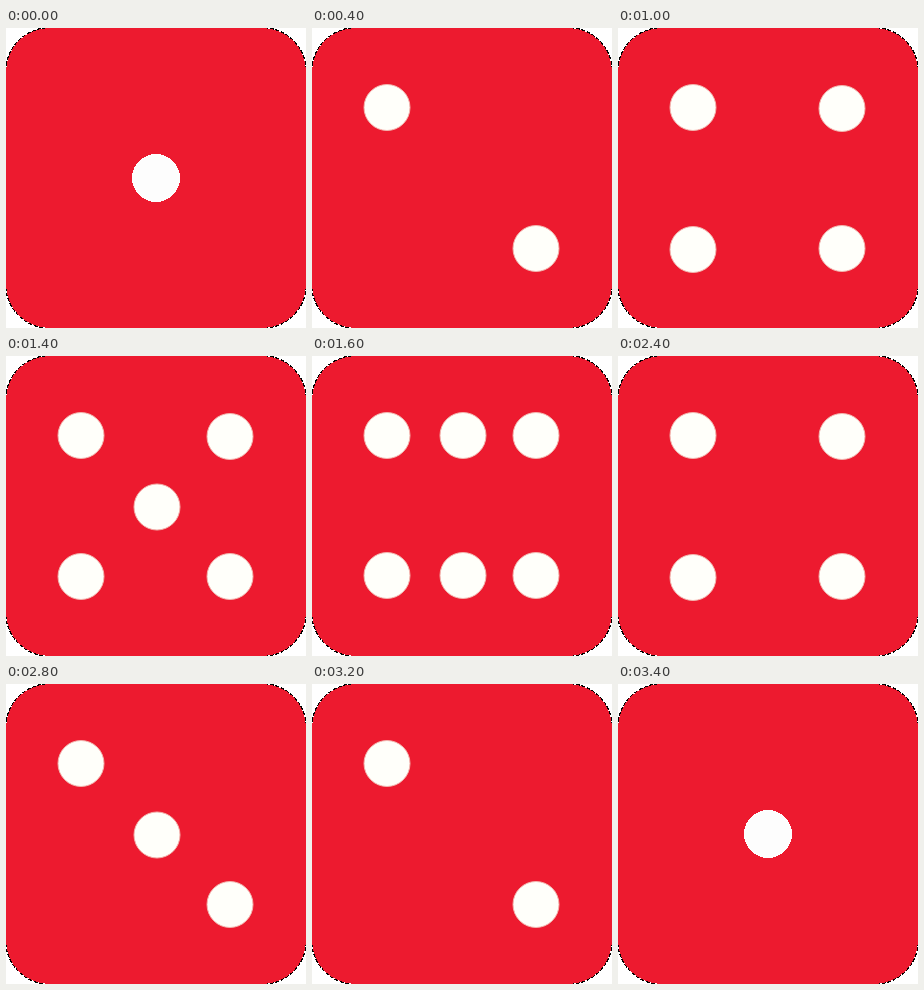
An HTML page for the animation above (3600 ms loop, 300x300 px).

```html
<!DOCTYPE html>
<html lang="en">
<head>
<meta charset="utf-8">
<title>Die</title>
<style>
  html, body { margin: 0; width: 100%; height: 100%; overflow: hidden; background: #fff; }
  svg { display: block; width: 100%; height: 100%; }
</style>
</head>
<body>
<svg viewBox="0 0 300 300">
  <g shape-rendering="crispEdges">
    <!-- broken dark rim, visible only around the corners -->
    <rect width="300" height="300" rx="44" fill="none" stroke="#000" stroke-width="2" stroke-dasharray="4 1.5"/>
    <rect width="300" height="300" rx="44" fill="#ed1a2f"/>
  </g>
  <g id="pips"></g>
</svg>
<script>
  const LOOP = 3600;
  const TL = [75, 79.5], TR = [224, 80.5], BL = [75, 220.5], BR = [224, 220.5];
  const MID = [151, 151];

  const faces = {
    1: [[150, 150]],
    2: [TL, BR],
    3: [TL, MID, BR],
    4: [TL, TR, [75, 221.5], BR],
    5: [TL, TR, MID, BL, BR],
    6: [79.5, 219.5].flatMap(y => [75, 151, 224].map(x => [x, y]))
  };

  // [start in ms, face value]
  const steps = [
    [0, 1], [400, 2], [600, 3], [1000, 4], [1400, 5], [1600, 6],
    [2200, 5], [2400, 4], [2800, 3], [3200, 2], [3400, 1]
  ];

  // the single pip is hard-edged, the others have a soft rim
  const single = { r: 24, fill: '#fdfdfd', stroke: 'none', 'shape-rendering': 'crispEdges' };
  const soft = { r: 23, fill: '#fffffa', stroke: '#f2b5ae', 'shape-rendering': 'auto' };

  const group = document.getElementById('pips');
  const pips = Array.from({ length: 6 }, () =>
    group.appendChild(document.createElementNS('http://www.w3.org/2000/svg', 'circle')));

  function set(node, attrs) {
    for (const name in attrs) node.setAttribute(name, attrs[name]);
  }

  function draw(time) {
    const t = time % LOOP;
    const value = steps.filter(([start]) => start <= t).pop()[1];
    const style = value === 1 ? single : soft;
    pips.forEach((pip, i) => {
      const spot = faces[value][i];
      pip.style.display = spot ? '' : 'none';
      if (spot) set(pip, { cx: spot[0], cy: spot[1], ...style });
    });
  }

  const begin = performance.now();
  function tick() {
    draw(performance.now() - begin);
    requestAnimationFrame(tick);
  }
  tick();
</script>
</body>
</html>
```
